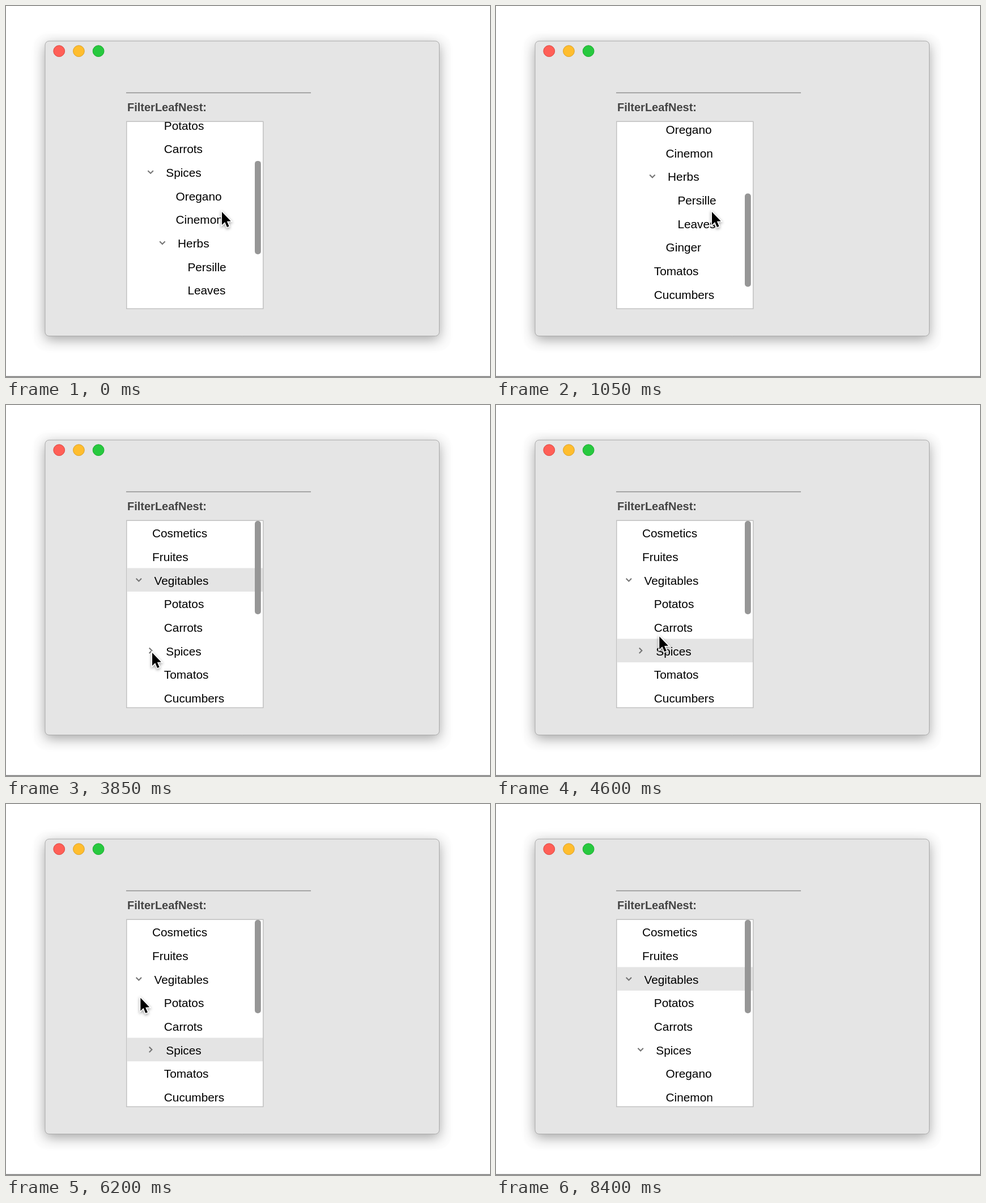
Animation of 854x656 px, one loop 9800 ms. Source, as an HTML page with a canvas:

```html
<!DOCTYPE html>
<html lang="en">
<head>
<meta charset="utf-8">
<title>Tree list</title>
<style>
  html, body { margin: 0; width: 100%; height: 100%; overflow: hidden; background: #fff; }
  canvas { display: block; }
</style>
</head>
<body>
<canvas id="stage" width="854" height="656"></canvas>
<script>
const ctx = document.getElementById('stage').getContext('2d');
const LOOP = 9800, TICK = 50;
const FONT = '"Liberation Sans", Arial, sans-serif';
const VIEW = { x: 213.5, y: 205, w: 239.5, h: 330 };
const ROW = 41.67, INDENT = 20.8, MAX_SCROLL = 16 * ROW - VIEW.h;

// Label, followed by children for a branch
const TREE = [
  ['Cosmetics'],
  ['Fruites'],
  ['Vegitables', [
    ['Potatos'],
    ['Carrots'],
    ['Spices', [
      ['Oregano'],
      ['Cinemon'],
      ['Herbs', [['Persille'], ['Leaves']]],
      ['Ginger']
    ]],
    ['Tomatos'],
    ['Cucumbers']
  ]],
  ['Nuts'],
  ['Drinks']
];

const smooth = u => u * u * (3 - 2 * u);
const easeIn = u => u * u;
const easeOut = u => 1 - (1 - u) ** 2;
const linear = u => u;

// Pointer moves: start time, ticks, destination, easing
const MOVES = [
  [1700, 5, 332, 348, smooth],
  [2450, 9, 256, 456, smooth],
  [2900, 6, 249, 435, smooth],
  [3850, 1, 258, 438, linear],
  [3900, 4, 304, 438, easeOut],
  [4500, 10, 231, 305, smooth],
  [6050, 11, 252, 431, smooth],
  [6900, 3, 271, 396, easeIn],
  [7050, 7, 322, 302, easeOut],
  [8250, 3, 558, 4, linear]
];

const mix = (a, b, u) => a + (b - a) * u;

// Progress 0..1 that advances once per tick
function steps(t, start, count) {
  const n = Math.floor((t - start) / TICK) + 1;
  return Math.max(0, Math.min(count, n)) / count;
}

function flatten(nodes, closed, depth = 0, out = []) {
  for (const [name, kids] of nodes) {
    const open = !!kids && !closed.includes(name);
    out.push({ name, depth, branch: !!kids, open });
    if (open) flatten(kids, closed, depth + 1, out);
  }
  return out;
}

const FULL = flatten(TREE, []);
const NO_SPICES = flatten(TREE, ['Spices']);
const TOP_ONLY = flatten(TREE, ['Vegitables']);

function box(x, y, w, h, r) {
  ctx.beginPath();
  ctx.roundRect(x, y, w, h, r);
}

function shadow(color, blur, dy) {
  ctx.shadowColor = color;
  ctx.shadowBlur = blur;
  ctx.shadowOffsetY = dy;
}

function drawWindow() {
  ctx.fillStyle = '#fff';
  ctx.fillRect(0, 0, 854, 656);
  ctx.fillStyle = '#fdfdfd';
  box(49, 49, 736, 561, 24);
  ctx.fill();

  ctx.save();
  shadow('rgba(0,0,0,0.36)', 22, 6);
  ctx.fillStyle = '#e5e5e5';
  box(69, 62, 695.5, 521.5, 7);
  ctx.fill();
  ctx.restore();
  ctx.strokeStyle = '#aaa';
  ctx.lineWidth = 1;
  ctx.stroke();

  const lights = [['#ff5f57', '#dc4640'], ['#ffbd2e', '#dba026'], ['#27c93f', '#1dab30']];
  lights.forEach(([fill, edge], i) => {
    ctx.beginPath();
    ctx.arc(93.7 + i * 34.7, 79.7, 9.9, 0, 7);
    ctx.fillStyle = fill;
    ctx.fill();
    ctx.strokeStyle = edge;
    ctx.stroke();
  });

  ctx.fillStyle = '#8e8e8e';
  ctx.fillRect(212, 152.7, 326, 1.5);
  ctx.fillStyle = '#7a7a7a';
  ctx.fillRect(0, 654.5, 854, 1.5);

  ctx.fillStyle = '#444';
  ctx.font = 'bold 20px ' + FONT;
  ctx.fillText('FilterLeafNest:', 214, 185.7);

  ctx.fillStyle = '#c1c1c1';
  ctx.fillRect(212, 203.5, 242.5, 332.5);
  ctx.fillStyle = '#fff';
  ctx.fillRect(VIEW.x, VIEW.y, VIEW.w, VIEW.h - 0.5);
}

function drawLabel(row, top, selected, alpha) {
  ctx.globalAlpha = alpha;
  if (row.name === selected) {
    ctx.fillStyle = '#e4e4e4';
    ctx.fillRect(VIEW.x, top, VIEW.w, ROW);
  }
  ctx.fillStyle = '#000';
  ctx.font = '20.8px ' + FONT;
  const x = 258 + row.depth * INDENT + (row.branch ? 3.5 : 0);
  ctx.fillText(row.name, x, top + ROW / 2 + 8.5);
}

function drawChevron(row, top, alpha) {
  if (!row.branch) return;
  ctx.save();
  ctx.globalAlpha = alpha;
  ctx.translate(234.3 + row.depth * INDENT, top + ROW / 2);
  if (!row.open) ctx.rotate(-Math.PI / 2);
  ctx.beginPath();
  ctx.moveTo(-4.7, -2.4);
  ctx.lineTo(0, 2.3);
  ctx.lineTo(4.7, -2.4);
  ctx.strokeStyle = '#757575';
  ctx.lineWidth = 2.1;
  ctx.stroke();
  ctx.restore();
}

// Crossfades between two row lists; rows they share stay solid
function drawList(from, to, fade, scroll, selected) {
  ctx.save();
  ctx.beginPath();
  ctx.rect(VIEW.x, VIEW.y, VIEW.w, VIEW.h - 0.5);
  ctx.clip();
  const count = Math.max(from.length, to.length);
  for (let i = 0; i < count; i++) {
    const top = VIEW.y + i * ROW - scroll;
    if (top > VIEW.y + VIEW.h || top + ROW < VIEW.y) continue;
    const a = from[i], b = to[i];
    const same = a && b && a.name === b.name;
    if (a) drawLabel(a, top, selected, same ? 1 : 1 - fade);
    if (b && !same) drawLabel(b, top, selected, fade);
    if (a) drawChevron(a, top, 1 - fade);
    if (b) drawChevron(b, top, fade);
  }
  ctx.globalAlpha = 1;
  ctx.fillStyle = '#969696';
  box(439, VIEW.y + scroll * 0.49, 10.8, 165, 5);
  ctx.fill();
  ctx.restore();
}

function drawPointer(x, y) {
  const shape = [[0, 0], [0, 23], [5.2, 18], [9, 27], [12.6, 25.5], [8.8, 16.8], [15.8, 16.4]];
  ctx.save();
  ctx.translate(x, y);
  ctx.beginPath();
  shape.forEach(([px, py]) => ctx.lineTo(px, py));
  ctx.closePath();
  ctx.lineWidth = 3.2;
  ctx.strokeStyle = '#fff';
  shadow('rgba(0,0,0,0.4)', 5, 2);
  ctx.stroke();
  shadow('transparent', 0, 0);
  ctx.fillStyle = '#000';
  ctx.fill();
  ctx.restore();
}

function scrollAt(t) {
  if (t < 950) return mix(140.6, MAX_SCROLL, 1 - (1 - steps(t, 50, 11)) ** 1.6);
  return MAX_SCROLL * (1 - steps(t, 950, 7) ** 1.72);
}

function pointerAt(t) {
  let x = 381, y = 364;
  for (const [start, count, tx, ty, ease] of MOVES) {
    const u = ease(steps(t, start, count));
    x = mix(x, tx, u);
    y = mix(y, ty, u);
  }
  return [x, y];
}

function draw(t) {
  const selected = t >= 4250 && t < 7600 ? 'Spices' : 'Vegitables';
  const scroll = scrollAt(t);
  drawWindow();
  if (t >= 5200 && t < 6050) {
    const fade = t < 5800
      ? Math.min(0.98, steps(t, 5200, 5))
      : 1 - steps(t, 5800, 5);
    drawList(NO_SPICES, TOP_ONLY, fade, scroll, selected);
  } else {
    const fade = steps(t, 3400, 4) - steps(t, 6800, 4);
    drawList(FULL, NO_SPICES, fade, scroll, selected);
  }
  if (t < 8400) drawPointer(...pointerAt(t));
}

let origin;
function frame(now) {
  origin ??= now;
  draw((now - origin) % LOOP);
  requestAnimationFrame(frame);
}
requestAnimationFrame(frame);
</script>
</body>
</html>
```
